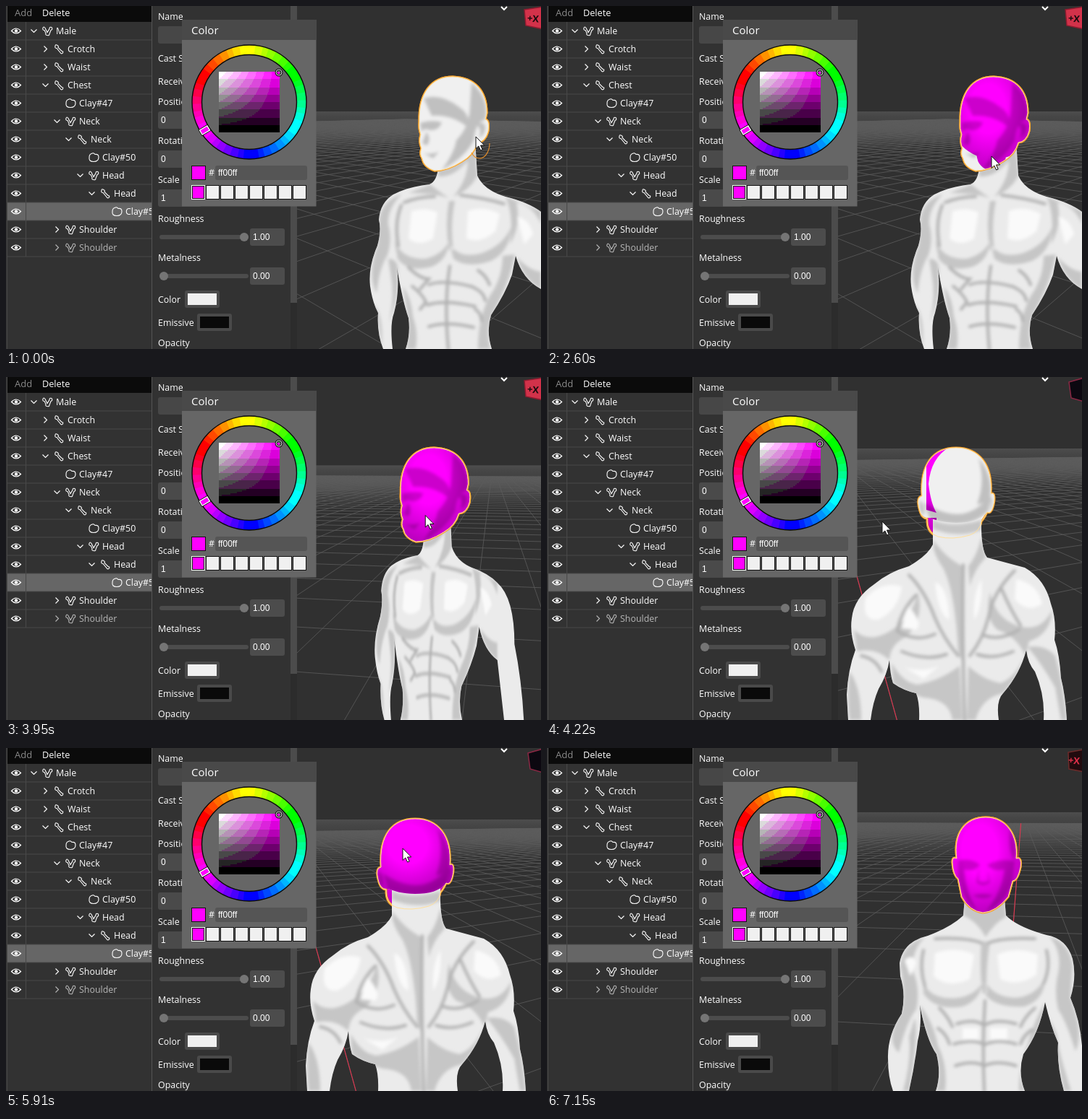
Animation, 739 px wide and 475 px high, one loop 7730 ms. Source, as an HTML page:

```html
<!DOCTYPE html>
<html lang="en">
<head>
<meta charset="utf-8">
<title>Head painting</title>
<style>
html, body { margin: 0; width: 100%; height: 100%; overflow: hidden; background: #323232; }
svg { display: block; width: 739px; height: 475px; }
text { font: 500 12.4px "Open Sans", "Noto Sans", sans-serif; fill: #fff; white-space: pre; }
.num { font: 12px "Liberation Sans", Arial, sans-serif; }
</style>
</head>
<body>
<svg id="stage" viewBox="0 0 739 475">
  <defs>
    <clipPath id="view"><rect x="402" width="337" height="475"/></clipPath>
    <clipPath id="tree"><rect width="201" height="475"/></clipPath>
    <linearGradient id="haze" x2="0" y2="1">
      <stop stop-color="#4d4d4d"/><stop offset=".15" stop-color="#464646"/><stop offset="1" stop-color="#303030"/>
    </linearGradient>
    <radialGradient id="paint" cx=".4" cy=".34" r=".74">
      <stop offset=".35" stop-color="#f0f"/><stop offset="1" stop-color="#b000b4"/>
    </radialGradient>
    <filter id="soft"><feGaussianBlur stdDeviation="2.2"/></filter>
  </defs>
</svg>
<script>
const LOOP = 7730, NS = 'http://www.w3.org/2000/svg';
const stage = document.getElementById('stage');
const defs = stage.querySelector('defs');

function add(parent, tag, attrs = {}, text) {
  const el = document.createElementNS(NS, tag);
  set(el, attrs);
  if (text !== undefined) el.textContent = text;
  parent.appendChild(el);
  return el;
}
function set(el, attrs) { for (const k in attrs) el.setAttribute(k, attrs[k]); }
const box = (p, x, y, width, height, fill, rx = 0) => add(p, 'rect', { x, y, width, height, fill, rx });
const label = (p, x, y, s, attrs = {}) => add(p, 'text', { x, y, ...attrs }, s);
const path = (p, d, attrs) => add(p, 'path', { d, fill: 'none', ...attrs });
const clamp = v => Math.max(0, Math.min(1, v));
const span = (t, a, b) => clamp((t - a) / (b - a));
const smooth = v => v * v * (3 - 2 * v);
const mix = (a, b, k) => a + (b - a) * k;

// ---------- viewport ----------
const scene = add(stage, 'g', { 'clip-path': 'url(#view)' });
box(scene, 402, 0, 337, 475, '#303030');
const haze = box(scene, 402, 146, 337, 50, 'url(#haze)');
const grid = path(scene, '', { stroke: '#5c5c5c', 'stroke-width': .8 });
const axis = path(scene, '', { stroke: '#e0364f', 'stroke-width': 1.1 });

const POSES = {
  quarter: {
    x: 617, phi: 38,
    body: 'M597 222Q596 242 585 247Q556 250 535 261Q517 272 515 296Q519 310 513 332Q500 362 503 388Q506 410 514 425Q512 452 521 475H534Q530 440 536 425Q544 395 540 362Q548 410 556 432Q559 455 552 475H671Q663 450 670 428Q690 398 699 372L704 346Q713 378 739 392L752 475H790Q786 420 772 370Q772 306 739 285Q722 272 690 264Q660 255 651 235L648 186L600 200Z',
    tone: 'M597 226Q628 226 648 188L651 235Q642 254 618 264Q638 240 638 214Q618 238 597 236Z M586 247Q602 260 612 266Q588 258 556 259Z M516 294Q519 270 547 260Q527 280 528 302Q534 322 527 345Q515 364 512 398Q498 372 514 330Z M528 350Q543 350 541 370Q543 404 529 438Q537 402 532 376Z M536 322Q545 352 580 350Q603 344 612 326Q610 352 588 361Q556 370 541 350Z M613 330Q626 350 655 343Q686 333 698 306Q696 340 670 353Q636 364 618 350Z M612 270Q606 302 612 338H618Q613 304 620 270Z M690 264Q702 290 696 330Q712 304 705 272Q728 276 739 302V284Z M703 344Q694 388 672 425Q662 450 669 475H652Q652 432 668 402Q686 376 686 346Z M548 388Q560 404 562 430Q570 452 566 475H553Q558 450 555 430Z M506 412Q522 424 519 475L513 428Z M706 348Q722 366 739 368V392Q714 378 706 348Z',
    line: 'M613 360Q605 410 611 475M584 386Q604 378 645 389M582 414Q606 406 648 416M584 444Q608 436 646 445M556 362Q572 378 584 378L572 392M561 388Q576 400 580 410L572 420M652 366Q664 374 668 386M646 390Q660 396 662 408M648 420Q656 424 657 436M546 276Q536 300 542 332M628 262Q662 266 688 274M592 264Q570 264 550 272',
    light: 'M560 284Q580 278 596 286L590 322Q570 334 556 322ZM638 284Q660 276 682 288L676 312Q656 330 636 322ZM706 292Q722 294 728 316L716 330Z',
    top: 'M571 160C570 120 588 98 617 98C648 99 664 118 664 148L662 157Q668 158 666 173Q662 188 651 189Q646 206 630 215Q610 228 592 228Q577 223 575 211Q571 205 574 197Q570 188 573 178Q570 170 571 160Z',
    shade: 'M643 106Q668 128 662 157Q648 162 646 186Q634 210 602 227Q620 202 622 186Q640 168 641 140Z M577 128Q600 120 626 140Q642 150 638 168Q616 150 588 152Z M572 162Q588 157 602 161Q598 173 586 172Q578 168 574 174Z M581 174Q588 186 581 193L575 190Z M577 204Q588 206 598 202L590 211Z M651 164Q662 158 662 170Q660 181 653 182Q658 174 651 164Z'
  },
  back: {
    x: 566, phi: 155,
    body: 'M533 194V232Q526 247 500 262Q472 270 452 287Q424 306 421 334Q418 354 426 378Q416 404 414 440L416 475H447Q450 450 458 432Q470 412 473 392Q474 412 478 424Q492 434 510 438Q515 452 514 475H624Q620 448 630 438Q654 410 662 378Q664 396 674 408Q688 440 686 475H718Q716 440 710 417Q708 384 701 364Q704 336 696 314Q688 280 660 264Q630 256 608 250Q599 240 600 194Z',
    tone: 'M533 198Q560 210 600 198V212Q566 224 533 210Z M534 226Q550 250 574 262Q574 340 576 400L568 380Q564 300 548 266Q538 252 534 238Z M600 222Q594 248 582 262L584 290Q590 266 606 250Z M424 350Q446 372 480 348Q508 326 512 298Q522 334 496 360Q474 370 473 392Q454 374 428 380Z M612 298Q620 338 656 346Q684 352 698 322Q696 356 666 366L661 386Q648 358 622 350Q604 334 612 298Z M476 396Q492 424 512 426Q544 420 570 400L574 475H560Q556 446 520 444Q492 436 478 424Z M661 384Q646 418 626 424Q600 418 582 400L580 475H592Q600 444 630 438Q652 414 661 384Z M418 408Q434 430 434 475H418Q414 440 418 408Z M664 374Q684 398 702 430L710 475H718Q714 430 702 386Q688 370 664 374Z',
    line: 'M575 260Q573 350 577 475M500 274Q522 296 536 334Q548 362 568 386M646 268Q616 298 610 332Q602 364 584 386M484 352Q510 368 536 356M490 380Q524 394 552 384M652 350Q626 366 604 358M644 380Q616 392 594 384M434 386Q454 390 462 408M510 302Q490 322 484 350M628 294Q640 322 654 344',
    light: 'M440 306Q462 282 490 290Q486 322 458 336Q434 338 440 306ZM536 284Q554 290 556 336Q540 330 536 284ZM648 280Q678 286 684 314Q664 328 646 308ZM494 402Q520 410 542 400L520 418ZM600 280Q588 300 590 336Q602 320 600 280ZM498 316Q520 340 510 350L490 348Z',
    under: 'M518 165C515 120 534 98 565 98C597 98 616 122 613 162C619 158 619 170 616 180Q613 190 608 187Q604 196 600 200Q598 214 584 219Q560 226 540 221Q524 216 525 196Q517 196 514 182Q510 166 518 165Z',
    top: 'M518 165C515 120 534 98 565 98C597 98 616 122 613 162C619 158 619 170 616 180Q613 190 608 187C600 198 584 202 565 202C548 202 536 198 528 195Q517 196 514 182Q510 166 518 165Z',
    shade: 'M521 174Q545 190 568 190Q596 188 612 162Q616 184 607 187Q592 203 565 203Q540 202 528 195Z M596 112Q616 136 612 166Q604 176 594 176Q606 146 596 112Z M515 170Q522 176 521 192Q513 188 515 170Z M614 166L609 186Q618 182 614 166Z'
  },
  front: {
    x: 605, phi: 5,
    body: 'M577 208L575 232Q558 248 526 260Q492 268 487 298L488 316Q496 340 490 368Q470 398 471 430Q471 456 478 475H500Q508 440 512 406Q518 382 515 356Q524 404 538 424Q545 452 537 475H660Q650 450 658 424Q680 394 688 352Q696 386 706 408Q704 440 714 475H739V412Q736 376 723 346Q732 318 726 292Q718 264 690 259Q650 248 634 232L632 208Z',
    tone: 'M577 208Q602 238 632 208L634 234Q618 242 606 262Q594 240 575 232Z M488 302Q490 272 522 262Q502 282 506 310Q516 334 510 362Q496 380 486 422Q466 404 490 366Q496 340 488 302Z M726 302Q722 270 694 261Q712 282 706 312Q700 336 706 362Q718 380 730 420Q742 396 723 346Z M520 324Q530 350 568 346Q592 342 602 324Q598 350 574 358Q536 364 520 340Z M606 324Q616 344 646 346Q676 344 688 318Q688 348 660 358Q620 360 606 342Z M515 356Q534 380 540 412Q554 440 550 475H538Q545 452 538 424Q522 400 515 356Z M688 352Q672 380 664 410Q652 436 652 475H660Q650 450 658 424Q682 394 688 352Z M600 268Q597 310 602 340H608Q605 310 612 268Z M508 374Q514 392 500 475H492Q504 430 500 400Z M694 374L714 475H724Q706 420 704 396Z',
    line: 'M605 350Q601 410 604 475M566 382Q590 374 604 384Q620 374 648 382M562 410Q590 402 604 411Q622 402 648 410M564 440Q588 432 604 440Q622 432 648 440M542 360Q554 372 560 386M540 388Q552 396 556 410M674 360Q660 372 654 386M670 390Q658 398 654 410M520 280Q514 304 522 330M690 280Q696 304 686 326M536 264Q580 262 600 270M674 264Q630 262 610 270',
    light: 'M536 284Q566 274 590 286L584 320Q554 334 534 316ZM622 286Q650 274 678 286L676 314Q650 332 626 320ZM494 294Q506 284 510 298L502 316ZM574 388H596V404H574ZM612 388H636V404H612Z',
    top: 'M566 153C561 118 578 96 606 96C634 96 651 120 648 153Q656 150 654 165Q650 184 643 184L637 206Q620 227 602 228Q584 226 573 206L568 181Q561 176 560 158Q560 150 566 153Z',
    shade: 'M568 156Q586 152 598 162Q590 172 576 168Q578 198 594 226Q574 210 568 181Z M608 162Q626 152 646 157L643 184Q636 212 606 227Q628 200 632 168Q616 172 608 162Z M597 166L593 186Q602 194 612 186L608 166L610 184Q602 188 596 184Z M588 204Q602 200 616 204Q602 212 588 204Z M640 112Q652 136 645 156Q636 140 640 112Z'
  }
};

for (const [name, p] of Object.entries(POSES)) {
  const mask = add(defs, 'mask', { id: 'm-' + name, maskUnits: 'userSpaceOnUse', x: 402, y: 0, width: 337, height: 475 });
  p.trail = add(mask, 'polyline', { fill: 'none', stroke: '#fff', 'stroke-width': 40, 'stroke-linecap': 'round', 'stroke-linejoin': 'round' });
  p.blob = add(mask, 'circle', { cx: p.x, cy: 150, r: name === 'front' ? 100 : 0, fill: '#fff' });
  if (name === 'back') path(mask, 'M556 97Q530 112 527 148Q530 175 538 188L524 184V110ZM518 195H538V226H518Z', { fill: '#fff' });

  p.root = add(scene, 'g');
  const coat = (parent, d) => {
    path(parent, d, { fill: '#f0f0f0' });
    path(add(parent, 'g', { mask: `url(#m-${name})` }), d, { fill: 'url(#paint)' });
  };
  // Soft shading that stays inside the given outline.
  const shaded = (parent, part) => {
    const id = `c-${name}-${part}`;
    path(add(defs, 'clipPath', { id }), p[part]);
    return add(add(parent, 'g', { 'clip-path': `url(#${id})` }), 'g', { filter: 'url(#soft)' });
  };
  const rim = p.under || p.top;
  if (p.under) coat(p.root, p.under);
  path(p.root, rim, { stroke: '#f5a02c', 'stroke-width': 3 });
  p.torso = add(p.root, 'g');
  path(p.torso, p.body, { fill: '#ebebeb' });
  const muscles = shaded(p.torso, 'body');
  path(muscles, p.tone, { fill: '#c6c6c6' });
  path(muscles, p.light, { fill: '#fafafa' });
  path(muscles, p.line, { stroke: '#b0b0b0', 'stroke-width': 4, 'stroke-linecap': 'round' });
  if (!p.under) path(p.root, rim, { stroke: '#f5a02c', 'stroke-width': 3 });
  coat(p.root, p.top);
  path(shaded(p.root, 'top'), p.shade, { fill: '#000', opacity: .2 });
  path(p.root, rim, { stroke: '#ffdf9c', 'stroke-width': 1 });
}

const ringStyle = { fill: 'none', stroke: '#e8902a', 'stroke-width': 1.1 };
const ring = add(scene, 'ellipse', { ...ringStyle, pathLength: 100 });
const twin = add(scene, 'ellipse', { ...ringStyle, cx: 568, cy: 170, rx: 4, ry: 16 });

path(scene, 'M684 1L688 5L692 1', { stroke: '#fff', 'stroke-width': 2 });
const cube = add(scene, 'polygon', { 'stroke-width': 1.5 });
const cubeText = label(scene, 720, 22, '+X', { style: 'font-weight:700;font-size:13px', transform: 'rotate(4 729 17)' });

// ---------- tree ----------
const tree = add(stage, 'g', { 'clip-path': 'url(#tree)' });
box(tree, 0, 0, 202, 475, '#323232');
box(tree, 2, 0, 199, 22, '#0b0b0b');
box(tree, 2, 272, 199, 25, '#666');
label(tree, 12, 14, 'Add', { style: 'fill:#8a8a8a;font-size:13px' });
label(tree, 50, 14, 'Delete', { style: 'font-size:12.7px' });
const ROWS = [
  ['Male', 0, 'v', 'joint'], ['Crotch', 1, '>', 'bone'], ['Waist', 1, '>', 'bone'], ['Chest', 1, 'v', 'bone'],
  ['Clay#47', 2, '', 'clay'], ['Neck', 2, 'v', 'joint'], ['Neck', 3, 'v', 'bone'], ['Clay#50', 4, '', 'clay'],
  ['Head', 4, 'v', 'joint'], ['Head', 5, 'v', 'bone'], ['Clay#51', 6, '', 'clay'],
  ['Shoulder', 2, '>', 'joint'], ['Shoulder', 2, '>', 'joint']
];
const ICONS = {
  bone: 'M-5-4Q-5-7-2-5Q0-4-1-2L4 3Q7 3 5 6Q3 7 2 5L-3-1Q-6-1-5-4Z',
  joint: 'M-6-4Q-5-7-3-4L0 2L3-3Q3-6 6-5Q8-2 5-1L3 4Q3 7 0 6Q-3 6-2 3L-4-1Q-7-1-6-4Z',
  clay: 'M-3-5Q0-7 2-4Q7-5 7 0Q7 6 0 6Q-7 6-6 0Q-6-4-3-5Z'
};
const ARROWS = { 'v': 'M-4-2L0 2L4-2', '>': 'M-2-4L2 0L-2 4' };
ROWS.forEach(([name, depth, arrow, icon], i) => {
  const y = 34.5 + 25 * i, x = 16 * depth, ink = i === 12 ? '#b8b8b8' : '#fff';
  box(tree, 2, y + 12, 199, 1, '#484848');
  const pen = { stroke: ink, 'stroke-width': 1.1 };
  path(tree, 'M7.5 0Q14-7 20.5 0Q14 7 7.5 0Z', { stroke: '#fff', 'stroke-width': 1.2, transform: `translate(0 ${y})` });
  add(tree, 'circle', { cx: 14, cy: y, r: 2.2, fill: '#fff' });
  if (arrow) path(tree, ARROWS[arrow], { ...pen, transform: `translate(${38.5 + x} ${y})` });
  path(tree, ICONS[icon], { ...pen, transform: `translate(${57 + x} ${y})` });
  label(tree, 69 + x, y + 4.5, name, { style: 'fill:' + ink });
});
box(tree, 27, 22, 1, 325, '#484848');
box(tree, 1, 0, 1, 475, '#484848');

// ---------- properties ----------
const props = add(stage, 'g');
box(props, 201, 0, 201, 475, '#323232');
box(props, 201, 0, 1, 475, '#555');
box(props, 393, 0, 9, 475, '#2c2c2c');
box(props, 393, 0, 9, 411, '#4c4c4c');
[['Name', 19], ['Cast Shadow', 77], ['Receive Shadow', 109], ['Position', 137], ['Rotation', 191], ['Scale', 245],
 ['Roughness', 299], ['Metalness', 353], ['Color', 411], ['Emissive', 443], ['Opacity', 471]]
  .forEach(([s, y]) => label(props, 210, y, s));
box(props, 210, 28, 60, 24, '#474747', 3);
['0', '0', '1'].forEach((s, i) => {
  box(props, 210, 146 + 54 * i, 60, 24, '#4a4a4a', 3);
  label(props, 214, 162 + 54 * i, s, { class: 'num' });
});
[[320, 329, '1.00'], [374, 218, '0.00']].forEach(([y, x, s]) => {
  box(props, 212, y - 3, 123, 6, '#4c4c4c', 3);
  add(props, 'circle', { cx: x, cy: y, r: 6, fill: '#757575' });
  box(props, 337, y - 12, 48, 24, '#4c4c4c', 3);
  label(props, 341, y + 4, s, { class: 'num' });
});
[[247, 394, '#f0f0f0'], [264, 426, '#0a0a0a']].forEach(([x, y, c]) => {
  box(props, x, y, 48, 24, '#4a4a4a', 3);
  box(props, x + 4, y + 4, 40, 16, c);
});

// ---------- colour dialog ----------
const dialog = add(stage, 'g');
box(dialog, 243, 19, 185.5, 258.5, '#666');
box(dialog, 243, 19, 185.5, 28, '#494949');
label(dialog, 256, 39, 'Color', { style: 'font-size:15px' });
const level = v => Math.round(Math.min(7, Math.floor(v * 8 + 1e-6)) / 7 * 255);
const rgb = (...c) => `rgb(${c.map(level)})`;
const hueChannel = (h, k) => clamp(Math.abs(((h / 60 + k) % 6) - 3) - 1);
const CX = 336, CY = 133, R0 = 65.5, R1 = 79;
const polar = (r, a) => `${CX + r * Math.cos(a)} ${CY + r * Math.sin(a)}`;
for (let deg = 0; deg < 360; deg += 2) {
  const a = deg * Math.PI / 180, b = (deg + 2.6) * Math.PI / 180, h = (deg + 153) % 360;
  path(dialog, `M${polar(R0, a)}L${polar(R1, a)}L${polar(R1, b)}L${polar(R0, b)}Z`,
    { fill: rgb(hueChannel(h, 0), hueChannel(h, 4), hueChannel(h, 2)) });
}
[R0, R1].forEach(r => add(dialog, 'circle', { cx: CX, cy: CY, r, fill: 'none', stroke: '#0a0a0a', 'stroke-width': 1.4 }));
const SIDE = 84;
const shadeAt = (x, y) => { const v = 1 - y / SIDE; return rgb(v, v * (1 - x / SIDE), v); };
for (let y = 0; y < SIDE; y += 2) {
  for (let x = 0, from = 0; x < SIDE; x++) {
    const c = shadeAt(x + .5, y + 1);
    if (x === SIDE - 1 || shadeAt(x + 1.5, y + 1) !== c) {
      box(dialog, 294 + from, 91 + y, x + 1 - from, 2, c);
      from = x + 1;
    }
  }
}
const handle = { x: -6, y: -3.5, width: 12, height: 7, fill: '#f0f', transform: 'translate(274.5 172) rotate(-31)' };
add(dialog, 'rect', { ...handle, stroke: '#111', 'stroke-width': 3 });
add(dialog, 'rect', { ...handle, stroke: '#fff', 'stroke-width': 1.4 });
add(dialog, 'circle', { cx: 377, cy: 92, r: 4, fill: 'none', stroke: '#111', 'stroke-width': 3 });
add(dialog, 'circle', { cx: 377, cy: 92, r: 4, fill: 'none', stroke: '#ddd', 'stroke-width': 1 });
box(dialog, 256, 221, 20, 20, '#111');
box(dialog, 257, 222, 18, 18, '#f0f');
label(dialog, 280, 235, '#');
box(dialog, 289, 221, 127, 20, '#555', 3);
label(dialog, 293, 235, 'ff00ff', { class: 'num' });
for (let i = 0; i < 8; i++) {
  const x = 256 + 20 * i;
  box(dialog, x, 248, 19, 20, i ? '#111' : '#fff');
  box(dialog, x + 1, 249, 17, 18, i ? '#f0f0f0' : '#111');
  if (!i) box(dialog, x + 2, 250, 15, 16, '#f0f');
}

const cursor = path(stage, 'M0 0V16.5L3.8 13L6.6 19L9.2 18L6.5 12H11.7Z', { fill: '#fff', stroke: '#111', 'stroke-width': 1 });

// ---------- motion ----------
const MOVES = [
  [0, 649, 181], [100, 649, 181], [350, 656, 187], [800, 631, 187], [1310, 631, 187], [1480, 600, 178], [1650, 640, 160],
  [1850, 596, 150], [2030, 634, 140], [2200, 645, 120], [2400, 600, 122], [2600, 614, 208], [2800, 632, 196],
  [2980, 592, 212], [3150, 625, 206], [3500, 697, 183], [3720, 697, 183], [4180, 463, 200], [4400, 463, 200],
  [4520, 490, 172], [4680, 540, 150], [4850, 580, 116], [5000, 545, 172], [5150, 590, 178], [5300, 598, 142],
  [5480, 606, 176], [5650, 526, 178], [5800, 560, 125], [5910, 548, 139], [6090, 548, 139],
  [6840, 717, 234], [7150, 739, 437]
];
function pointer(t) {
  const i = MOVES.findIndex(m => m[0] > t);
  if (i < 0) return [760, 460];
  const [t0, x0, y0] = MOVES[i - 1], [t1, x1, y1] = MOVES[i];
  const k = smooth(span(t, t0, t1));
  return [mix(x0, x1, k), mix(y0, y1, k)];
}
function trail(from, to) {
  const pts = [];
  for (let t = from; t <= to; t += 20) pts.push(pointer(t).map(v => v.toFixed(1)).join());
  return pts.join(' ');
}

function camera(t) {
  const out = smooth(span(t, 3720, 4180)), back = smooth(span(t, 6100, 6830));
  const travel = (a, b, c) => mix(mix(a, b, out), c, back);
  return { phi: travel(38, 155, 5), x: travel(617, 566, 605), horizon: travel(146, 99, 89) };
}

const FOCAL = 500, HEIGHT = 1.75, DEPTH = 1.3, CENTER = 612;
let lastPhi = null;
function drawFloor({ phi, x, horizon }) {
  if (phi === lastPhi) return;
  lastPhi = phi;
  const a = phi * Math.PI / 180, s = Math.sin(a), c = Math.cos(a), x0 = (x - CENTER) / FOCAL * DEPTH;
  const place = (u, v) => [x0 - u * s + v * c, DEPTH - u * c - v * s];
  const segment = (p, q) => {
    if (p[1] > q[1]) [p, q] = [q, p];
    const near = .6;
    if (q[1] < near) return '';
    if (p[1] < near) {
      const k = (near - p[1]) / (q[1] - p[1]);
      p = [mix(p[0], q[0], k), near];
    }
    const at = ([X, Z]) => `${(CENTER + FOCAL * X / Z).toFixed(1)} ${(horizon + FOCAL * HEIGHT / Z).toFixed(1)}`;
    return `M${at(p)}L${at(q)}`;
  };
  const far = 56;
  let d = '';
  for (let i = -far; i <= far; i += .8) d += segment(place(i, -far), place(i, far)) + segment(place(-far, i), place(far, i));
  set(grid, { d });
  set(axis, { d: segment(place(-far, 0), place(far, 0)) });
  set(haze, { y: horizon });
}

const girth = deg => {
  const a = deg * Math.PI / 180;
  return Math.hypot(Math.cos(a), .62 * Math.sin(a));
};
const CUBES = {
  quarter: { points: '716,5 742,1 742,32 718,27', fill: '#d2324a', stroke: '#8e1c30', ink: '#190b0e' },
  back: { points: '721,7 742,1 742,34 724,29', fill: '#0c0810', stroke: '#8a2844', ink: 'none' },
  front: { points: '720,6 742,2 742,33 721,29', fill: '#210b0e', stroke: '#6d2b2a', ink: '#e0304a' }
};

function draw(t) {
  const cam = camera(t);
  drawFloor(cam);
  const now = cam.phi > 97 ? 'back' : cam.phi > 20 ? 'quarter' : 'front';
  for (const [name, p] of Object.entries(POSES)) {
    p.root.style.display = name === now ? '' : 'none';
    if (name !== now) continue;
    const k = girth(cam.phi) / girth(p.phi);
    set(p.root, { transform: `translate(${cam.x - p.x} 0)` });
    set(p.torso, { transform: `translate(${p.x} 0) scale(${k} 1) translate(${-p.x} 0)` });
  }
  const { points, fill, stroke, ink } = CUBES[now];
  set(cube, { points, fill, stroke });
  cubeText.style.fill = ink;

  const { quarter, back } = POSES;
  set(quarter.trail, { points: trail(1310, Math.min(t, 3200)) });
  set(quarter.blob, { r: 62 * span(t, 1400, 2500) + 40 * span(t, 2800, 3150) });
  set(back.trail, { points: trail(4540, Math.min(t, 5900)) });
  set(back.blob, { r: 100 * span(t, 4750, 5850) });

  const [x, y] = pointer(t), open = smooth(span(t, 300, 750));
  set(cursor, { transform: `translate(${x} ${y})`, visibility: t < 7150 ? 'visible' : 'hidden' });
  set(ring, {
    cx: x + mix(5, -1, open), cy: y + mix(9, -3, open), rx: mix(14, 22, open), ry: mix(21, 28, open),
    'stroke-dasharray': `${mix(38, 100, open)} 100`, visibility: t < 1380 ? 'visible' : 'hidden'
  });
  set(twin, { visibility: t > 450 && t < 1380 ? 'visible' : 'hidden' });
}

const start = performance.now();
function tick() {
  draw((performance.now() - start) % LOOP);
  requestAnimationFrame(tick);
}
tick();
</script>
</body>
</html>
```
